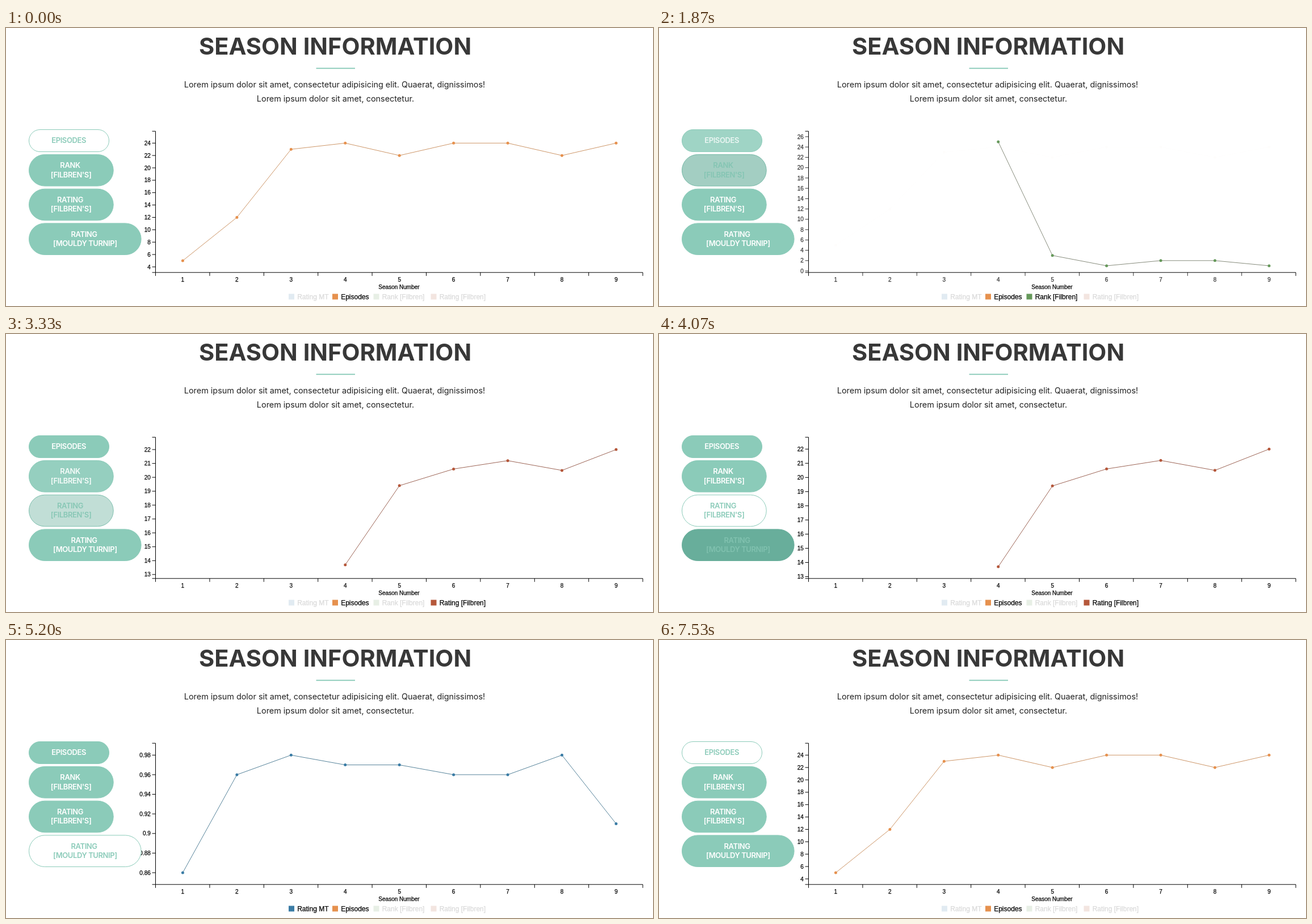
An HTML page for the animation above (7.59 s loop, 1140 by 491 pixels).

```html
<!DOCTYPE html>
<html lang="en">
<head>
<meta charset="utf-8">
<title>Season information</title>
<style>
  html, body { margin: 0; width: 100%; height: 100%; overflow: hidden; background: #fff; }
  svg { display: block; width: 1140px; height: 491px; }
  .head { font-family: Inter, sans-serif; text-anchor: middle; fill: #222; }
  .btn { font: 600 13px Inter, sans-serif; letter-spacing: -0.4px; text-anchor: middle; }
  .axis { font: 10px "Liberation Sans", Arial, sans-serif; fill: #000; }
  .axis path, .axis line { fill: none; stroke: #000; stroke-width: 1; }
  .axis text, .legend text { stroke: #000; stroke-width: 0.25px; }
  .legend { font: 12px "Liberation Sans", Arial, sans-serif; fill: #000; }
</style>
</head>
<body>
<svg id="stage" viewBox="0 0 1140 491">
  <defs>
    <clipPath id="plot"><rect x="263" y="178" width="860" height="254"/></clipPath>
    <clipPath id="yclip"><rect x="200" y="178" width="70" height="266"/></clipPath>
  </defs>
  <g class="head">
    <text x="580" y="47" font-size="41.6" font-weight="700" fill="#383838">SEASON INFORMATION</text>
    <rect x="546.5" y="70.3" width="68.5" height="1.9" fill="#8bcbb9"/>
    <text x="579" y="105" font-size="14.4">Lorem ipsum dolor sit amet, consectetur adipisicing elit. Quaerat, dignissimos!</text>
    <text x="580.5" y="130" font-size="14.4">Lorem ipsum dolor sit amet, consectetur.</text>
  </g>
</svg>
<script>
const LOOP = 7590, AXIS_Y = 431.8, AXIS_X = 263.5, BAND = 95.4;
const TOP_Y = 203.3, SPAN = 207.7;      // pixel row of the maximum, distance to the minimum
const MOVE = 350, FADE = 250, SHADE = 500;

const svg = document.getElementById('stage');

function add(parent, tag, attrs = {}, text) {
  const el = document.createElementNS('http://www.w3.org/2000/svg', tag);
  for (const k in attrs) el.setAttribute(k, attrs[k]);
  if (text !== undefined) el.textContent = text;
  parent.appendChild(el);
  return el;
}

const clamp = v => Math.max(0, Math.min(1, v));
const mix = (a, b, p) => a + (b - a) * p;
const cubic = p => p < 0.5 ? 4 * p ** 3 : 1 - 4 * (1 - p) ** 3;

// CSS "ease": cubic-bezier(.25, .1, .25, 1)
function ease(x) {
  if (x <= 0 || x >= 1) return clamp(x);
  let lo = 0, hi = 1, u = 0.5;
  for (let i = 0; i < 24; i++) {
    u = (lo + hi) / 2;
    const at = 0.75 * u * (1 - u) + u ** 3;
    if (at < x) lo = u; else hi = u;
  }
  return 0.3 * u * (1 - u) ** 2 + 3 * u * u * (1 - u) + u ** 3;
}

/* ---------- chart data ---------- */
const series = {
  mt: { label: 'Rating MT', color: '#3a7ca5', line: '#56839a', legendX: 498, first: 1,
        data: [.86, .96, .98, .97, .97, .96, .96, .98, .91], ticks: [.86, .98, .02] },
  episodes: { label: 'Episodes', color: '#e6914e', line: '#cd9668', legendX: 575, first: 1,
        data: [5, 12, 23, 24, 22, 24, 24, 22, 24], ticks: [4, 24, 2] },
  rank: { label: 'Rank [Filbren]', color: '#65995a', line: '#868b7a', legendX: 647.5, first: 4,
        data: [25, 3, 1, 2, 2, 1], ticks: [0, 26, 2] },
  rating: { label: 'Rating [Filbren]', color: '#b5573a', line: '#9c6455', legendX: 748.5, first: 4,
        data: [13.7, 19.4, 20.6, 21.2, 20.5, 22], ticks: [13, 22, 1] }
};

const clicks = [
  { at: 0, show: 'episodes' },
  { at: 1651, show: 'rank' },
  { at: 3050, show: 'rating' },
  { at: 4442, show: 'mt' },
  { at: 6117, show: 'episodes' }
];

const xAt = season => 311.4 + BAND * 1.0005 * (season - 1);
function yAt(v, scale) {
  const max = Math.max(...scale.data), min = Math.min(...scale.data);
  return TOP_Y + (max - v) / (max - min) * SPAN;
}

/* ---------- axes ---------- */
const axis = add(svg, 'g', { class: 'axis' });
const xTicks = add(axis, 'g', { 'text-anchor': 'middle' });
for (let i = 1; i <= 9; i++) {
  if (i < 9) {
    const x = AXIS_X + BAND * i;
    add(xTicks, 'line', { x1: x, x2: x, y1: AXIS_Y, y2: AXIS_Y + 6 });
  }
  add(xTicks, 'text', { x: xAt(i), y: 447.5 }, i);
}
add(axis, 'path', { d: `M${AXIS_X} ${AXIS_Y + 6}V${AXIS_Y}H1122V${AXIS_Y + 6}` });
add(axis, 'path', { d: `M257.5 182.3H${AXIS_X}V${AXIS_Y}H257.5` });
add(axis, 'text', { x: 692.5, y: 461, 'text-anchor': 'middle' }, 'Season Number');
const yAxis = add(axis, 'g', { 'text-anchor': 'end', 'clip-path': 'url(#yclip)' });
const plot = add(svg, 'g', { 'clip-path': 'url(#plot)' });
const legend = add(svg, 'g', { class: 'legend' });

for (const s of Object.values(series)) {
  const [from, to, step] = s.ticks;
  s.tickGroup = add(yAxis, 'g');
  s.tickList = [];
  for (let i = 0; i <= Math.round((to - from) / step); i++) {
    const value = +(from + i * step).toFixed(2);
    const el = add(s.tickGroup, 'g');
    add(el, 'line', { x1: 257.5, x2: AXIS_X, y1: 0, y2: 0 });
    add(el, 'text', { x: 254.8, y: 3.6 }, value);
    s.tickList.push({ value, el });
  }

  s.group = add(plot, 'g');
  s.path = add(s.group, 'polyline', { fill: 'none', stroke: s.line, 'stroke-width': 1 });
  s.dots = s.data.map((v, i) =>
    add(s.group, 'circle', { cx: xAt(s.first + i), r: 2.5, fill: s.color }));

  s.legendItem = add(legend, 'g');
  add(s.legendItem, 'rect', { x: s.legendX, y: 469.5, width: 10, height: 10, fill: s.color });
  add(s.legendItem, 'text', { x: s.legendX + 15.2, y: 479.4 }, s.label);
}

function drawChart(t) {
  let n = clicks.length - 1;
  while (clicks[n].at > t) n--;
  const now = clicks[n].show, was = n ? clicks[n - 1].show : now;
  const since = n ? t - clicks[n].at : Infinity;
  const p = cubic(clamp(since / MOVE)), shown = cubic(clamp(since / FADE));
  const place = v => mix(yAt(v, series[was]), yAt(v, series[now]), p);

  xTicks.setAttribute('opacity', p);
  for (const id in series) {
    const s = series[id], on = id === now;
    s.tickGroup.setAttribute('opacity', on ? p : 0);
    if (on) for (const k of s.tickList) k.el.setAttribute('transform', `translate(0 ${place(k.value)})`);

    const alpha = on ? shown : id === was ? 1 - shown : 0;
    s.group.setAttribute('opacity', alpha);
    if (alpha > 0) {
      const ys = s.data.map(place);
      s.path.setAttribute('points', ys.map((y, i) => `${xAt(s.first + i)},${y}`).join(' '));
      s.dots.forEach((d, i) => d.setAttribute('cy', ys[i]));
    }
    s.legendItem.setAttribute('opacity', on || id === 'episodes' ? 1 : 0.15);
  }
}

/* ---------- buttons ---------- */
const TEAL = [139, 203, 185], DARK = [104, 174, 155], WHITE = [255, 255, 255];
const looks = {
  off:   { fill: TEAL,  edge: TEAL, text: WHITE },
  hover: { fill: DARK,  edge: DARK, text: [128, 193, 175] },
  on:    { fill: WHITE, edge: TEAL, text: TEAL }
};

const buttons = [
  { y: 179, w: 142, h: 40, rows: [['EPISODES', 110.6, 203.2]],
    start: 'on', steps: [[1606, 'off'], [5450, 'hover'], [6270, 'on']] },
  { y: 223, w: 149.7, h: 56.6, rows: [['RANK', 113, 247.3], ["[FILBREN'S]", 114.6, 263.8]],
    start: 'off', steps: [[1250, 'hover'], [1750, 'on'], [3005, 'off']] },
  { y: 283.7, w: 149.7, h: 56.6, rows: [['RATING', 113, 307.9], ["[FILBREN'S]", 114.6, 324.4]],
    start: 'off', steps: [[2150, 'hover'], [3160, 'on'], [4397, 'off']] },
  { y: 344.4, w: 198.6, h: 56.6, rows: [['RATING', 137.6, 368.7], ['[MOULDY TURNIP]', 139.4, 385.2]],
    start: 'off', steps: [[3540, 'hover'], [4590, 'on'], [6072, 'off']] }
];

for (const b of buttons) {
  b.group = add(svg, 'g', { class: 'btn' });
  b.box = add(b.group, 'rect', { x: 40.5, y: b.y + 0.5, width: b.w - 1, height: b.h - 1, rx: (b.h - 1) / 2 });
  b.words = add(b.group, 'g');
  for (const [word, x, y] of b.rows) add(b.words, 'text', { x, y }, word);
}

function drawButton(b, t) {
  let from = b.start, to = b.start, p = 1;
  for (const [at, look] of b.steps) {
    if (t < at) break;
    from = to;
    to = look;
    p = ease((t - at) / SHADE);
  }
  const tone = key => `rgb(${looks[from][key].map((c, i) => Math.round(mix(c, looks[to][key][i], p)))})`;
  b.box.setAttribute('fill', tone('fill'));
  b.box.setAttribute('stroke', tone('edge'));
  b.words.setAttribute('fill', tone('text'));
}

/* ---------- loop ---------- */
const begin = performance.now();
function draw() {
  const t = (performance.now() - begin) % LOOP;
  drawChart(t);
  for (const b of buttons) drawButton(b, t);
  requestAnimationFrame(draw);
}
draw();
</script>
</body>
</html>
```
